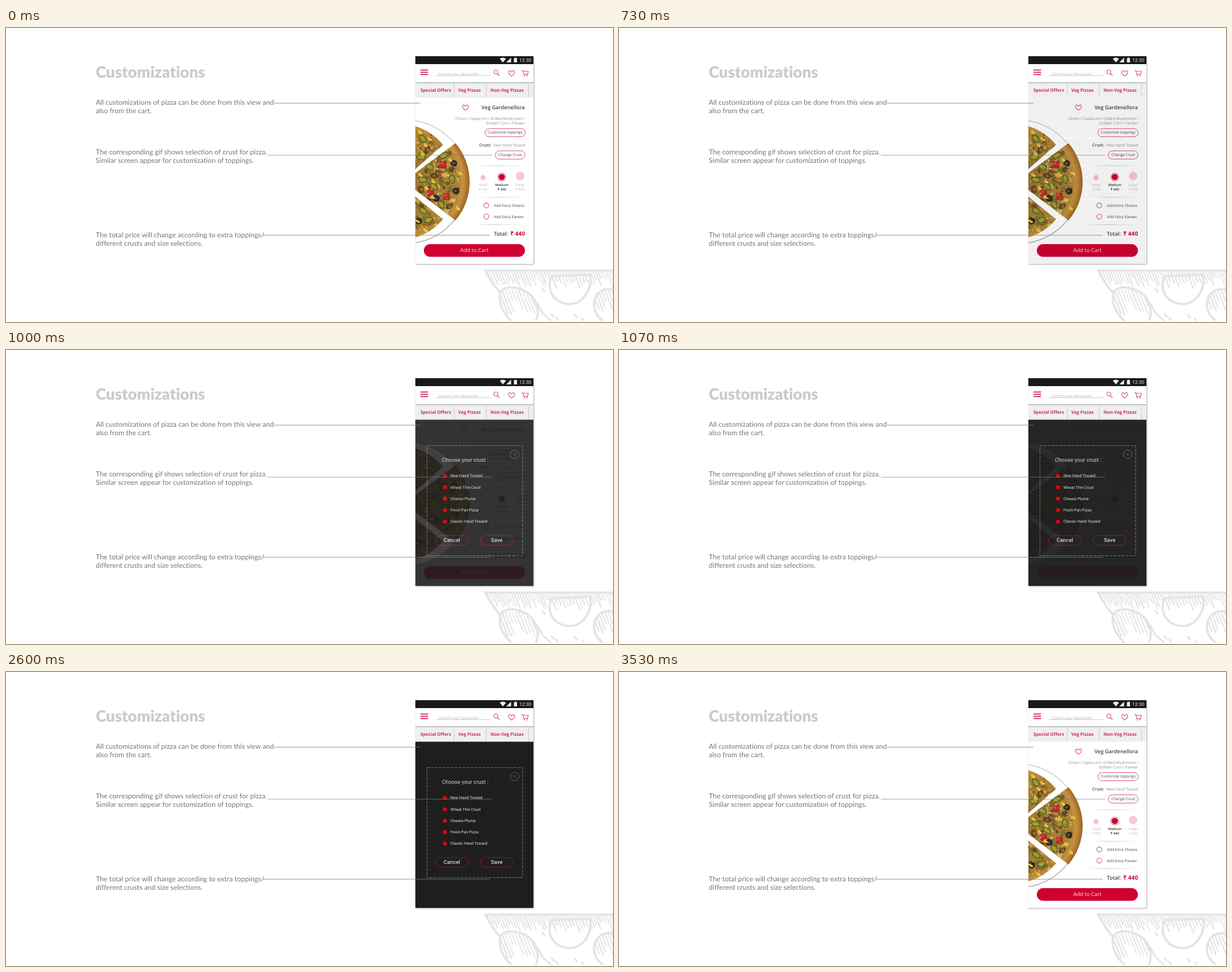
Write an HTML page with a canvas that moves like this. It is 1075 px wide and 521 px high and loops after 3790 ms.

```html
<!DOCTYPE html>
<html lang="en">
<head>
<meta charset="utf-8">
<title>Customizations</title>
<style>
html, body { margin: 0; width: 100%; height: 100%; overflow: hidden; background: #fff; }
canvas { display: block; }
</style>
</head>
<body>
<canvas id="stage" width="1075" height="521"></canvas>
<script>
const W = 1075, H = 521, LOOP = 3790, TICK = 200 / 3;
const RED = '#d00030', PINK = '#d84e7a', INK = '#444';
const OPEN = '"Open Sans", sans-serif', LATO = 'Lato, sans-serif', ROBOTO = 'Roboto, sans-serif';
const screen = document.getElementById('stage').getContext('2d');

let c; // context of the layer being drawn
let seed = 7;
const rnd = () => (seed = (seed * 16807) % 2147483647) / 2147483647;
const between = (a, b) => a + (b - a) * rnd();

function layer(draw) {
  const el = document.createElement('canvas');
  el.width = W;
  el.height = H;
  c = el.getContext('2d');
  c.textRendering = 'geometricPrecision';
  c.letterSpacing = '0.005px'; // any spacing turns ligatures off
  draw();
  return el;
}

function text(str, x, y, font, color, align = 'left') {
  c.font = font;
  c.fillStyle = color;
  c.textAlign = align;
  c.fillText(str, x, y);
}

function rect(x, y, w, h, color) {
  c.fillStyle = color;
  c.fillRect(x, y, w, h);
}

function stroke(color, width) {
  c.strokeStyle = color;
  c.lineWidth = width;
  c.stroke();
}

function line(points, color, width = 1) {
  c.beginPath();
  points.forEach(([x, y]) => c.lineTo(x, y));
  stroke(color, width);
}

function disc(x, y, r, color) {
  c.beginPath();
  c.arc(x, y, r, 0, 7);
  c.fillStyle = color;
  c.fill();
}

function ring(x, y, r, color, width = 1) {
  c.beginPath();
  c.arc(x, y, r, 0, 7);
  stroke(color, width);
}

function pill(x, y, w, h, color, filled) {
  c.beginPath();
  c.roundRect(x, y, w, h, h / 2);
  if (filled) {
    c.fillStyle = color;
    c.fill();
  } else stroke(color, 1);
}

function heart(x, y, s) {
  c.beginPath();
  c.moveTo(x, y + s * 0.9);
  c.bezierCurveTo(x - s * 1.8, y - s * 0.3, x - s * 0.8, y - s * 1.6, x, y - s * 0.45);
  c.bezierCurveTo(x + s * 0.8, y - s * 1.6, x + s * 1.8, y - s * 0.3, x, y + s * 0.9);
  stroke(PINK, 1.1);
}

// --- pizza -----------------------------------------------------------

const PLATE = { x: 708, y: 272.5, r: 109.5 };

const slices = [
  'M715 182 V259 L725 250 L774 207 A101 101 0 0 0 725 174 Z',
  'M715 264 V280 L725 287 L796 341 A106 106 0 0 0 796 204 L725 257 Z',
  'M715 290 V374 L725 371 A101 101 0 0 0 774 339 L725 299 Z'
].map(d => new Path2D(d));

function clipPhone() {
  c.beginPath();
  c.rect(725, 123, 209, 295);
  c.clip();
}

function blob(x, y, r, color) {
  c.beginPath();
  c.ellipse(x, y, r, r * between(0.55, 0.9), between(0, 3), 0, 7);
  c.fillStyle = color;
  c.fill();
}

function scatter(n, reach, rMin, rMax, colors) {
  for (let i = 0; i < n; i++) {
    const a = between(-1.6, 1.6), d = reach * Math.sqrt(rnd());
    blob(712 + d * Math.cos(a), 272 + d * Math.sin(a), between(rMin, rMax), colors[i % colors.length]);
  }
}

function pepper(x, y, turn) {
  c.save();
  c.translate(x, y);
  c.rotate(turn);
  c.beginPath();
  c.ellipse(0, 0, 7.5, 4.5, 0, 0, 7);
  c.fillStyle = '#a39b3a';
  c.fill();
  stroke('#666a1e', 2.4);
  c.restore();
}

function arc(from, to, color, width) {
  c.beginPath();
  c.arc(PLATE.x, PLATE.y, PLATE.r, from, to);
  stroke(color, width);
}

function pizza() {
  c.save();
  clipPhone();
  arc(-1.5, -0.68, '#bdbdbd', 1.2);
  arc(0.65, 1.5, '#b2b2b2', 1.6);

  const area = new Path2D();
  slices.forEach(s => area.addPath(s));
  c.clip(area);
  const base = c.createRadialGradient(712, 272, 10, 712, 272, 110);
  base.addColorStop(0, '#98742f');
  base.addColorStop(0.78, '#ad8237');
  base.addColorStop(0.88, '#c6923f');
  base.addColorStop(1, '#96601f');
  rect(715, 160, 120, 225, base);
  scatter(130, 88, 2, 6, ['#bd9442', '#745c24', '#d2b263', '#8e6828', '#7f7430']);
  scatter(30, 82, 3, 6, ['#614a20', '#77712a']);
  scatter(40, 104, 1, 3, ['#cf9c4a', '#a97429']);
  scatter(200, 92, 0.7, 2, ['#dfc680', '#5c451c', '#b98f3e', '#8a8038']);

  [[750, 246, 0.4], [790, 268, 1.4], [738, 269, 0.2], [775, 226, -0.4], [758, 281, 0.6],
   [771, 313, 1], [738, 196, 0.9], [735, 229, 0.1], [739, 324, 0.5], [748, 340, -0.3]]
    .forEach(p => pepper(...p));
  [[774, 242], [780, 298], [752, 293]].forEach(([x, y]) => {
    c.beginPath();
    c.roundRect(x - 6, y - 6, 12, 13, 3);
    c.fillStyle = '#b8292a';
    c.fill();
    blob(x - 2, y - 2, 3, '#d5493c');
  });
  [[758, 262], [764, 258], [746, 216], [735, 286], [785, 316]].forEach(([x, y]) => {
    blob(x, y, 7, '#5c4321');
    blob(x + 1, y, 3.5, '#916a36');
  });
  [[793, 240], [797, 289], [762, 302], [731, 342]].forEach(([x, y]) => {
    disc(x, y, 6, '#2b2628');
    disc(x - 1, y, 2.5, '#665039');
  });
  [[780, 259], [755, 271], [754, 299], [762, 350], [728, 342], [742, 207], [737, 223], [749, 196],
   [785, 233], [803, 257], [790, 305], [744, 283], [733, 260], [799, 319], [742, 358], [732, 184]]
    .forEach(([x, y]) => {
      blob(x, y, 3.4, '#e5c02c');
      blob(x + 3, y + 2, 2.3, '#efd653');
    });
  scatter(120, 90, 0.6, 1.4, ['#d9bd6c', '#54401c', '#a87c33']);
  c.restore();
}

// --- page ------------------------------------------------------------

function copy() {
  text('Customizations', 159, 88, '900 27.8px ' + LATO, '#cbcbcb');
  [[136, 'All customizations of pizza can be done from this view and', 'also from the cart.'],
   [224, 'The corresponding gif shows selection of crust for pizza.', 'Similar screen appear for customization of toppings.'],
   [371.3, 'The total price will change according to extra toppings/', 'different crusts and size selections.']]
    .forEach(([y, a, b]) => {
      text(a, 159, y, '12.37px ' + LATO, '#777');
      text(b, 159, y + 14.6, '12.37px ' + LATO, '#777');
    });
}

function hatch(x1, x2, y, gap, minLen, maxLen, color) {
  for (let x = x1; x < x2; x += gap) {
    const len = between(minLen, maxLen);
    line([[x, y], [x + len * 0.4, y + len]], color, between(1.6, 2.8));
  }
}

function sketch() {
  const tone = '#e4e4e4';
  c.save();
  c.beginPath();
  c.rect(845, 428, 230, 91);
  c.clip();
  c.lineCap = 'round';
  rect(847, 428, 228, 3.5, tone);
  hatch(851, 1080, 429, 4.8, 12, 30, tone);

  const edge = new Path2D('M848 429 Q862 455 878 473 T918 530');
  c.strokeStyle = tone;
  c.lineWidth = 4;
  c.stroke(edge);

  // Toppings: white shapes with their own shading strokes.
  [['M875 470 C881 453 919 457 935 480 C944 494 944 511 936 524 H901 C880 507 872 488 875 470 Z', 880, 934, 464, 46],
   ['M966 440 C957 463 968 486 995 489 C1022 491 1038 464 1035 437 Z', 967, 1034, 436, 30],
   ['M1080 464 C1051 457 1036 478 1043 501 Q1048 515 1066 525 H1080 Z', 1044, 1080, 463, 38]]
    .forEach(([d, x1, x2, y, len]) => {
      const shape = new Path2D(d);
      c.save();
      c.clip(shape);
      rect(845, 428, 230, 93, '#fff');
      hatch(x1 - 8, x2, y, 6, len * 0.4, len, tone);
      c.restore();
      c.strokeStyle = tone;
      c.lineWidth = 4;
      c.stroke(shape);
    });
  line([[941, 488], [950, 505], [968, 521]], tone, 3);
  [[966, 507], [974, 513], [1007, 508], [1020, 515], [950, 462]].forEach(([x, y]) =>
    line([[x, y], [x + 4, y + 5]], tone, 3));
  c.restore();
}

function statusBar() {
  rect(725, 50, 209, 14, '#191919');
  c.fillStyle = '#e8e8e8';
  c.fill(new Path2D('M874.5 54.5 Q880 50.5 885.5 54.5 L880 61 Z'));
  c.fill(new Path2D('M886 61 L894.5 52.5 V61 Z'));
  c.fill(new Path2D('M899.5 53.5 H901 V52.5 H903.5 V53.5 H905 V61 H899.5 Z'));
  text('12:30', 909, 60, '8.5px ' + ROBOTO, '#eee');
}

function header() {
  [74.5, 78.5, 82.5].forEach(y => line([[734, y], [747.5, y]], '#cd1746', 1.7));
  text('Search your favourites', 766, 84, 'italic 300 7.5px ' + OPEN, '#999');
  line([[761, 84.5], [858, 84.5]], '#c9c9c9', 0.9);
  ring(867.6, 78, 3.5, PINK, 1.1);
  line([[870.2, 80.7], [874, 84.5]], PINK, 1.3);
  heart(895.5, 80.4, 5.3);
  line([[913, 75.5], [915.3, 75.5], [917, 82.4], [923.6, 82.4], [925, 76.8], [915.8, 76.8]], PINK, 1.1);
  ring(917.8, 84.6, 0.8, PINK);
  ring(922.8, 84.6, 0.8, PINK);

  rect(725, 97, 209, 26.5, '#efefef');
  rect(725, 96, 209, 1.7, '#b9b9b9');
  [793.5, 850.5, 925.5].forEach(x => line([[x, 99], [x, 123]], '#cfcfcf', 1.2));
  [['Special Offers', 734], ['Veg Pizzas', 801], ['Non-Veg Pizzas', 858]].forEach(([s, x]) =>
    text(s, x, 113, '700 7.87px ' + OPEN, '#d32a59'));
}

function divider(x1, x2, y) {
  const g = c.createLinearGradient(x1, 0, x2, 0);
  g.addColorStop(0, 'rgba(190,190,190,0)');
  g.addColorStop(0.4, '#c6c6c6');
  g.addColorStop(1, 'rgba(190,190,190,0.1)');
  line([[x1, y], [x2, y]], g, 1);
}

function sizeLabel(name, price, x, font, color) {
  text(name, x, 280, font, color, 'center');
  text('₹ ' + price, x, 287.5, font, color, 'center');
}

function product() {
  const light = '300 7.1px ' + OPEN, small = '6.7px ' + OPEN;
  heart(813.7, 141, 5.2);
  text('Veg Gardenellora', 919, 144, '600 9.3px ' + OPEN, INK, 'right');
  text('Onion I Capsicum I Grilled Mushroom I', 919, 163, light, '#555', 'right');
  text('Golden Corn I Paneer', 919, 171, light, '#555', 'right');
  pill(848.2, 178.3, 71.3, 14.4, PINK);
  text('Customize toppings', 884, 187.4, small, INK, 'center');
  text('Crust:', 838, 210.4, '600 7.4px ' + OPEN, INK);
  text('New Hand Tossed', 863, 210.4, '300 7px ' + OPEN, '#555');
  pill(866.5, 217.7, 52.6, 14.6, PINK);
  text('Change Crust', 893, 227.3, small, INK, 'center');

  divider(836, 918, 244);
  divider(836, 918, 300);
  divider(828, 916, 348.3);

  disc(844.8, 265.2, 4.6, '#f8c0d0');
  disc(878, 264, 5.6, RED);
  for (let i = 0; i < 12; i++) {
    const a = i * Math.PI / 6;
    disc(878 + 6.9 * Math.cos(a), 264 + 6.9 * Math.sin(a), 0.9, '#c33253');
  }
  disc(910.5, 262.3, 7.4, '#f9c6d5');
  sizeLabel('Small', 230, 845, '5.9px ' + OPEN, '#b5b5b5');
  sizeLabel('Medium', 440, 878, '600 5.9px ' + OPEN, '#333');
  sizeLabel('Large', 650, 910.3, '5.9px ' + OPEN, '#b5b5b5');

  ring(850.6, 314.5, 4.4, PINK, 1.1);
  ring(850.6, 334.2, 4.4, PINK, 1.1);
  text('Add Extra Cheese', 864, 317, '6.6px ' + OPEN, INK);
  text('Add Extra Paneer', 864, 336.6, '6.6px ' + OPEN, INK);
  text('Total:', 864, 368, '600 9.5px ' + OPEN, INK);
  text('₹ 440', 919, 368.3, '700 10.2px ' + OPEN, RED, 'right');
  pill(740, 383, 179, 22.6, RED, true);
  text('Add to Cart', 829.5, 397.2, '500 9.5px ' + OPEN, '#fbe9ee', 'center');
}

function page() {
  rect(0, 0, W, H, '#fff');
  sketch();
  copy();
  c.save();
  c.shadowColor = 'rgba(0,0,0,0.35)';
  c.shadowBlur = 2.5;
  c.shadowOffsetX = c.shadowOffsetY = 0.8;
  rect(725, 50, 209, 368, '#fff');
  c.restore();
  statusBar();
  header();
  pizza();
  product();
}

// --- crust dialog ----------------------------------------------------

function dialog() {
  rect(725, 123.5, 209, 294.5, '#1e1e1e');
  c.setLineDash([5, 2]);
  c.strokeStyle = '#777';
  c.lineWidth = 1;
  c.strokeRect(745.5, 169.5, 169.5, 195);
  c.setLineDash([]);
  ring(900.8, 185, 7.6, '#636363');
  line([[898, 182], [903.8, 188]], '#555', 0.9);
  line([[903.8, 182], [898, 188]], '#555', 0.9);
  text('Choose your crust :', 772, 198, '9.65px ' + ROBOTO, '#d2d2d2');
  ['New Hand Tossed', 'Wheat Thin Crust', 'Cheese Plume', 'Fresh Pan Pizza', 'Classic Hand Tossed']
    .forEach((name, i) => {
      const y = 223 + i * 20.25;
      disc(777.3, y, 3.6, '#e3000f');
      text(name, 787, y + 2.4, '7px ' + ROBOTO, '#e6e6e6');
    });
  [['Cancel', 789.6], ['Save', 869]].forEach(([name, x]) => {
    pill(x - 29, 328.8, 58.3, 17.3, '#b00633');
    text(name, x, 340.3, '500 9.5px ' + ROBOTO, '#d2d2d2', 'center');
  });
}

const gap = new Path2D();
gap.arc(PLATE.x, PLATE.y, PLATE.r, 0, 7);
slices.forEach(s => gap.addPath(s));

// The plate rim stays a little brighter while the dialog fades.
function rim(alpha) {
  c.save();
  clipPhone();
  c.beginPath();
  c.arc(PLATE.x, PLATE.y, PLATE.r, 0, 7);
  c.clip();
  c.fillStyle = `rgba(255,255,255,${alpha * (1 - alpha) * 0.8})`;
  c.fill(gap, 'evenodd');
  c.restore();
}

function callouts() {
  [[475, 734, 133.2], [464, 861, 225.4], [454, 857, 367.3]].forEach(([x1, x2, y]) =>
    line([[x1, y], [x2, y]], 'rgba(125,125,125,0.55)', 1.4));
}

function dialogAlpha(t) {
  if (t < 560 || t > 3500) return 0;
  if (t < 1370) return 1 / (1 + Math.exp((870 - t) * (t < 870 ? 0.0199 : 0.017)));
  return t < 2970 ? 1 : Math.exp((2930 - t) / 120);
}

const pageLayer = layer(page), dialogLayer = layer(dialog);

function frame(now) {
  const t = now % LOOP;
  const tick = Math.min(53, Math.floor((t + 4) / TICK));
  const alpha = dialogAlpha(tick * TICK);
  c = screen;
  c.globalAlpha = 1;
  c.drawImage(pageLayer, 0, 0);
  c.globalAlpha = alpha;
  c.drawImage(dialogLayer, 0, 0);
  c.globalAlpha = 1;
  rim(alpha);
  callouts();
  requestAnimationFrame(frame);
}
frame(performance.now());
</script>
</body>
</html>
```
